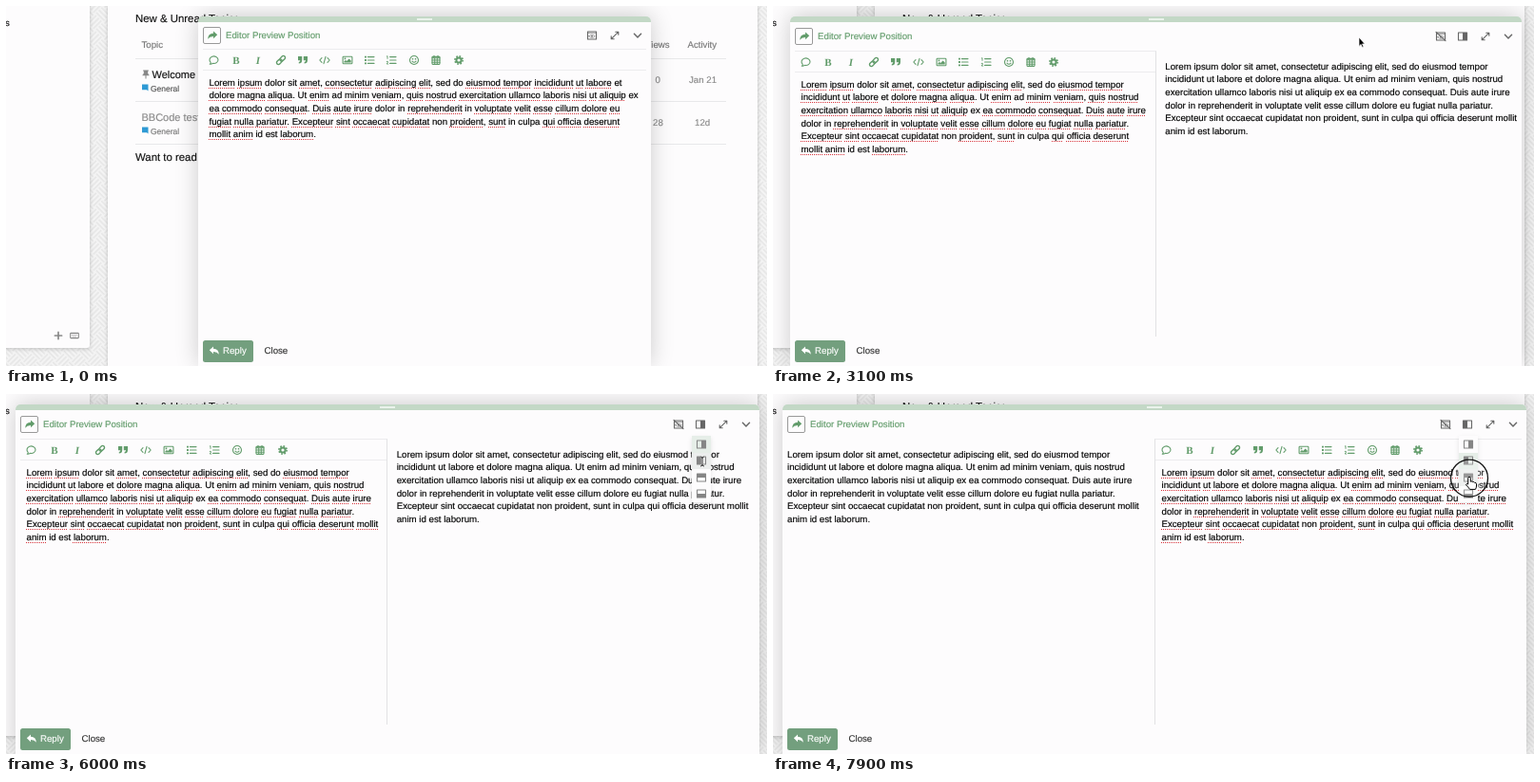
Animation of 800 by 379 pixels, one loop 8 s. Source, as an HTML page:

```html
<!DOCTYPE html>
<html lang="en">
<head>
<meta charset="utf-8">
<title>Editor preview position</title>
<style>
html, body { margin: 0; width: 100%; height: 100%; overflow: hidden; background: #fff; }
#stage { position: relative; width: 800px; height: 379px; overflow: hidden;
  font: 9.68px/14px "Liberation Sans", Arial, sans-serif; color: #111;
  text-rendering: geometricPrecision; -webkit-text-stroke: .15px; }
#stage svg.full { position: absolute; left: 0; top: 0; width: 800px; height: 379px; }
.t { position: absolute; white-space: nowrap; margin-top: -6.4px; }
.i { position: absolute; width: 12px; height: 12px; margin: -6px; overflow: visible;
  fill: none; stroke: currentColor; stroke-width: 1.1; stroke-linecap: round; stroke-linejoin: round; }
.i .f { fill: currentColor; stroke: none; }
#panel { position: absolute; top: 11px; height: 368px; border-radius: 5px 5px 0 0; background: #fdfcfd;
  box-shadow: 0 -1px 24px rgba(0,0,0,.2); --dy: 0px; --gap: 5.01%; }
#panel.split { --dy: 2px; --gap: 6.25%; }
#bar { position: absolute; left: 0; right: 0; top: 0; height: 6px; background: #c3d8c6; border-radius: 5px 5px 0 0; }
#bar::after { content: ""; position: absolute; left: 50%; top: 2px; width: 16px; height: 2px; margin-left: -8px; background: #eaf2eb; }
#in { position: absolute; left: 0; right: 0; top: -11px; height: 379px; }
#head { position: absolute; left: 0; right: 0; top: calc(var(--dy) * .6); height: 46px; color: #666; }
#head .box { position: absolute; left: 5px; top: 22px; width: 17px; height: 16px; border: 1px solid #999; border-radius: 2px; }
.green { color: #629c6b; }
#head .hot { color: #111; }
.split .solo, #panel:not(.split) .duo { display: none; }
#ed { position: absolute; left: 5px; right: 5px; top: calc(45px + var(--dy)); height: 300px;
  border: 0 solid #e2e2e4; border-top: 1px solid #ececee; }
.split #ed { right: 50%; border-right-width: 1px; }
.split.swap #ed { left: 50%; right: 5px; border-right-width: 0; border-left-width: 1px; }
#tools { position: absolute; left: 0; right: 0; top: 0; height: 21px; border-bottom: 1px solid #ececee; }
.para { position: absolute; line-height: 13.64px; color: #000; }
#ed .para { left: 6.5px; right: 6px; top: 28.6px; }
.para u { text-decoration: underline dotted #d8343c 1px; text-underline-offset: 1.6px; text-decoration-skip-ink: none; }
#pre { left: calc(50% + 9.7px); right: 3px; top: 57.6px; }
.swap #pre { left: 5px; right: calc(50% + 8px); }
#reply { position: absolute; left: 5px; top: 352px; width: 52.5px; height: 22.5px; border-radius: 2.5px; background: #739f7e; color: #fff; }
#menu { position: absolute; left: calc(100% - 71px); top: 44px; width: 20px; height: 70px; background: #fdfcfd;
  color: #858585; box-shadow: 0 2px 5px rgba(0,0,0,.1); }
#menu div { position: absolute; left: 0; width: 20px; height: 17.5px; }
#menu .sel { background: #e6eee8; }
#menu .over { background: #eceeed; }
</style>
</head>
<body>
<div id="stage">
  <svg class="full">
    <defs>
      <pattern id="weave" width="16" height="16" patternUnits="userSpaceOnUse" patternTransform="rotate(45) scale(1.5)">
        <rect width="16" height="16" fill="#f4f4f4"/>
        <path d="M0 1.5H8M0 4H8M0 6.5H8M8 9.5H16M8 12H16M8 14.5H16M9.5 0V8M12 0V8M14.5 0V8M1.5 8V16M4 8V16M6.5 8V16" stroke="#e5e5e5"/>
      </pattern>
      <filter id="soft" x="-20%" y="-20%" width="140%" height="140%"><feGaussianBlur stdDeviation="2"/></filter>
    </defs>
    <rect width="800" height="379" fill="url(#weave)"/>
    <path d="M-9-9H88V361H-9ZM107-9H790V399H107Z" fill="#000" opacity=".2" filter="url(#soft)"/>
    <rect x="-9" y="-9" width="97" height="369" rx="3" fill="#fdfcfd"/>
    <rect x="107" y="-9" width="683" height="400" fill="#fdfcfd"/>
    <path d="M136 55.5H757M136 100.5H757M136 145.5H757" stroke="#e8e8ea"/>
    <path d="M143 82.5h6.5v7l-1.5-1.2H143ZM143 127.5h6.5v7l-1.5-1.2H143Z" fill="#2f9ad4"/>
  </svg>
  <div id="page"></div>
  <div id="panel"><div id="bar"></div><div id="in"></div></div>
  <svg class="full">
    <circle id="ring" r="19.5" fill="#fff" fill-opacity=".15" stroke="#111" stroke-width="1.3"/>
    <g id="cursor" stroke-linejoin="round">
      <path id="arrow" d="M0 0V9.4L2.1 7.4 3.5 10.5 4.9 9.9 3.5 6.9H6.2Z" fill="#000" stroke="#fff" stroke-width=".7"/>
      <path id="hand" d="M-1.3 7V.6Q-1.3-.7 0-.7T1.3.6V4.2Q2.6 3.5 3.5 4.6 5 4 5.6 5.4 7.4 5 7.5 6.8V9Q7.4 11 6.4 12.4H.6Q-1 10-3.6 7.6-3.4 6-1.3 7Z" fill="#fff" stroke="#000"/>
      <g id="beam" fill="none">
        <path d="M-2-5Q0-5 0-3.5 0-5 2-5M0-4V4M-2 5Q0 5 0 3.5 0 5 2 5" stroke="#fff" stroke-width="2.2"/>
        <path d="M-2-5Q0-5 0-3.5 0-5 2-5M0-4V4M-2 5Q0 5 0 3.5 0 5 2 5" stroke="#222"/>
      </g>
    </g>
  </svg>
</div>
<script>
const $ = id => document.getElementById(id);
const frame = '<rect x="-4.5" y="-4" width="9" height="8"/>';
const half = d => frame + `<path class="f" d="${d}"/>`;
const letter = (s, css) => `<text class="f" y="3.8" text-anchor="middle" style="font:${css} 11px 'Liberation Serif',serif">${s}</text>`;
const eye = frame + '<path d="M-4.5-2.6H4.5M-3.2.8Q0-2.6 3.2.8 0 4-3.2.8Z" stroke-width=".6"/><circle class="f" cy=".8" r=".9"/>';
const swoosh = 'M5.2-.8 1-4.4v2.2Q-4.6-2-4.8 3.8-3 1 1 1.1v2.2z';
const shapes = {
  bubble: '<path d="M-4.7 4.2Q-3.6 3.4-3.8 2.3A4.5 3.8 0 1 1-1.6 3.4Q-3 4.4-4.7 4.2Z"/>',
  bold: letter('B', '700'),
  italic: letter('I', 'italic 700'),
  link: '<g transform="rotate(-45)" stroke-width="1.4"><rect x="-5.6" y="-1.9" width="6.4" height="3.8" rx="1.9"/><rect x="-.8" y="-1.9" width="6.4" height="3.8" rx="1.9"/></g>',
  quote: '<path class="f" d="M-5-4h4.2v4q0 3.6-3.4 3.6V2q1.5 0 1.5-1.8H-5ZM.8-4H5v4q0 3.6-3.4 3.6V2q1.5 0 1.5-1.8H.8Z"/>',
  code: '<path d="M-3-2.4-5.2 0-3 2.4M3-2.4 5.2 0 3 2.4M1-3.6-1 3.6"/>',
  image: '<rect x="-4.9" y="-3.8" width="9.8" height="7.6" rx=".8"/><path class="f" d="M-3.6 2.6V1.2L-2 0-.8 1 1.6-1.6 3.7.6v2ZM-3.4-2.4h1.7v1.7h-1.7Z"/>',
  list: '<path d="M-1.6-3.4H5M-1.6 0H5M-1.6 3.4H5"/><path class="f" d="M-5-4.3h1.9v1.9H-5ZM-5-1h1.9V1H-5ZM-5 2.4h1.9v1.9H-5Z"/>',
  numbers: '<path d="M-1.4-3.4H5M-1.4 0H5M-1.4 3.4H5"/><path d="M-4.6-4 -4-4.4V-1.6M-4.8 1.4Q-3.2.8-3.4 2L-4.8 4H-3.2" stroke-width=".9"/>',
  smile: '<circle r="4.5"/><path d="M-2 1.2Q0 3.4 2 1.2"/><path class="f" d="M-2.2-2h1.4v1.4h-1.4ZM.8-2h1.4v1.4H.8Z"/>',
  calendar: '<rect x="-4" y="-3.6" width="8" height="8" rx=".6"/><path d="M-4-2.2H4M-2-4.8V-3M2-4.8V-3M-4 0H4M-4 2.2H4M-1.3-2V4.2M1.3-2V4.2"/>',
  gear: '<circle r="2.6" stroke-width="2"/><circle r="4.1" stroke-width="1.7" stroke-linecap="butt" stroke-dasharray="1.61"/>',
  share: `<path class="f" d="${swoosh}"/>`,
  reply: `<path class="f" transform="scale(-1 1)" d="${swoosh}"/>`,
  eye,
  eyeOff: eye + '<path d="M-5-4.6 5 4.6"/>',
  right: half('M0-4H4.5V4H0Z'),
  left: half('M-4.5-4H0V4H-4.5Z'),
  top: half('M-4.5-4H4.5V0H-4.5Z'),
  bottom: half('M-4.5 0H4.5V4H-4.5Z'),
  expand: '<path d="M-3.6 3.6 3.6-3.6M.8-3.8H3.8V-.8M-3.8.8V3.8H-.8"/>',
  chevron: '<path d="M-3.6-1.8 0 1.9 3.6-1.8" stroke-width="1.4"/>',
  plus: '<path d="M-3.6 0H3.6M0-3.6V3.6" stroke-width="1.7"/>',
  keys: '<rect x="-4.3" y="-2.6" width="8.6" height="5.2" rx=".6"/><path d="M-2.6-.8H2.6M-1.8 1H1.8" stroke-dasharray="1 1" stroke-linecap="butt"/>',
  pin: '<path class="f" d="M-2.8-4.4H2.8V-3.2H2L2.4-.6Q3.6 0 3.6 1.2H.5V4.6H-.5V1.2H-3.6Q-3.6 0-2.4-.6L-2-3.2H-2.8Z"/>'
};
const css = x => typeof x === 'number' ? x + 'px' : x;
const icon = (name, x, y, cls = '', id = '') =>
  `<svg class="i ${cls}" ${id && `id="${id}"`} style="left:${css(x)};top:${y}px" viewBox="-6 -6 12 12">${shapes[name]}</svg>`;
const text = (s, x, y, color = '#111', size = 9.68) =>
  `<div class="t" style="left:${x}px;top:${y}px;color:${color};font-size:${size}px">${s}</div>`;
const end = px => `calc(100% - ${px}px)`;

$('page').innerHTML = text('s', -1, 18) +
  text('New &amp; Unread Topics', 136, 13, '#111', 11.4) + text('Topic', 142.5, 41, '#777') +
  text('Views', 672, 41, '#777') + text('Activity', 716.5, 41, '#777') +
  text('Welcome', 153.5, 72, '#111', 11) + text('General', 152, 86, '#555', 8.5) +
  text('0', 682.5, 78, '#888') + text('Jan 21', 718, 78, '#888') +
  text('BBCode test', 142.5, 117, '#8a8a8a', 11) + text('General', 152, 131, '#777', 8.5) +
  text('28', 680, 123, '#888') + text('12d', 724, 123, '#888') +
  text('Want to read more?', 136, 159, '#111', 11.4) +
  `<div style="color:#888">${icon('pin', 147, 72) + icon('plus', 54.5, 347) + icon('keys', 71.5, 346.5)}</div>`;

const lorem = 'Lorem ipsum dolor sit amet, consectetur adipiscing elit, sed do eiusmod tempor incididunt ut labore et dolore magna aliqua. Ut enim ad minim veniam, quis nostrud exercitation ullamco laboris nisi ut aliquip ex ea commodo consequat. Duis aute irure dolor in reprehenderit in voluptate velit esse cillum dolore eu fugiat nulla pariatur. Excepteur sint occaecat cupidatat non proident, sunt in culpa qui officia deserunt mollit anim id est laborum.';
const known = new Set('dolor sit sed do et Ut ad ex in non culpa id est'.split(' '));
const checked = lorem.replace(/\w+/g, w => known.has(w) ? w : `<u>${w}</u>`);
const tools = 'bubble bold italic link quote code image list numbers smile calendar gear'.split(' ');
const sides = ['right', 'left', 'top', 'bottom'];
const rowY = i => 53 + 17.4 * i;

$('in').innerHTML = `
  <div id="head"><div class="box"></div>
    ${icon('share', 14.5, 31, 'green')}<div class="green">${text('Editor Preview Position', 29, 31, 'inherit')}</div>
    ${icon('eye', end(62), 31, 'solo', 'show') + icon('eyeOff', end(85), 31, 'duo', 'hide')}
    ${icon('right', end(62), 31, 'duo', 'side') + icon('expand', end(38), 31) + icon('chevron', end(14.3), 31)}
  </div>
  <div id="ed"><div id="tools" class="green">${tools.map((n, i) => icon(n, `calc(11.7px + ${i} * var(--gap))`, 10.5)).join('')}</div>
    <div class="para">${checked}</div></div>
  <div id="pre" class="para duo">${lorem}</div>
  <div id="reply">${icon('reply', 12, 11) + text('Reply', 21, 11.5, '#fff')}</div>
  ${text('Close', 69.5, 363.5, '#333')}
  <div id="menu">${sides.map((n, i) => `<div style="top:${rowY(i) - 52.7}px">${icon(n, 10, 8.7)}</div>`).join('')}</div>`;
const rows = [...$('menu').children];

// time, x, y, cursor shape from this step on
const path = [
  [1600, 632, -14, 'arrow'], [1700, 627, -2, 'arrow'], [1800, 622, 9, 'arrow'], [1900, 616, 19, 'arrow'],
  [2100, 616, 30, 'hand'], [2300, 616, 33, 'hand'], [2700, 616, 33, 'arrow'], [3400, 616, 33, 'arrow'],
  [4000, 703, 32, 'hand'], [4200, 709, 32, 'hand'], [4300, 709, 32, 'hand'], [4600, 731, 33, 'hand'],
  [5200, 731, 33, 'hand'], [5500, 731, 60, 'beam'], [5700, 732, 71, 'beam'], [6400, 732, 71, 'beam'],
  [6600, 734, 45, 'hand'], [6800, 734, 35, 'hand'], [7150, 733, 35, 'hand'], [7550, 732, 86, 'hand'],
  [7700, 732, 88, 'hand'], [8000, 732, 88, 'hand']
];
const clicks = [[2500, 2700], [4700, 4900], [6150, 6350], [6850, 7000], [7850, 8000]];
const open = [[4900, 6350], [7000, 8000]];
const within = (t, spans) => spans.some(([a, b]) => t >= a && t < b);

function pointer(t) {
  const k = path.findIndex(p => p[0] > t);
  if (k < 1) return { x: -50, y: -50, shape: 'arrow' };
  const [a, x, y, shape] = path[k - 1], [b, x2, y2] = path[k], u = (t - a) / (b - a);
  return { x: x + (x2 - x) * u, y: y + (y2 - y) * u, shape };
}

function draw(t) {
  const u = Math.min(1, Math.max(0, (t - 2600) / 630)), grow = 1 - (1 - u) ** 2;
  const split = t >= 2600, swap = t >= 6350, panel = $('panel');
  panel.style.left = 202 - 192 * grow + 'px';
  panel.style.width = 476 + 306 * grow + 'px';
  panel.classList.toggle('split', split);
  panel.classList.toggle('swap', swap);
  const side = swap ? 'left' : 'right';
  if ($('side').dataset.at !== side) {
    $('side').dataset.at = side;
    $('side').innerHTML = shapes[side];
  }

  const { x, y, shape } = pointer(t), inHead = y > 24 && y < 45;
  const hot = (id, cx) => $(id).classList.toggle('hot', inHead && Math.abs(x - cx) < 9);
  hot('show', 616);
  hot('hide', 707);
  hot('side', 731);
  $('menu').style.display = within(t, open) ? '' : 'none';
  rows.forEach((row, i) => {
    row.classList.toggle('sel', sides[i] === side);
    row.classList.toggle('over', Math.abs(y - rowY(i)) < 8);
  });

  $('cursor').setAttribute('transform', `translate(${x} ${y})`);
  for (const id of ['arrow', 'hand', 'beam']) $(id).style.display = id === shape ? '' : 'none';
  $('ring').style.display = within(t, clicks) ? '' : 'none';
  $('ring').setAttribute('cx', x);
  $('ring').setAttribute('cy', y + .6);
}

function tick() {
  draw(performance.now() % 8000);
  requestAnimationFrame(tick);
}
tick();
</script>
</body>
</html>
```
